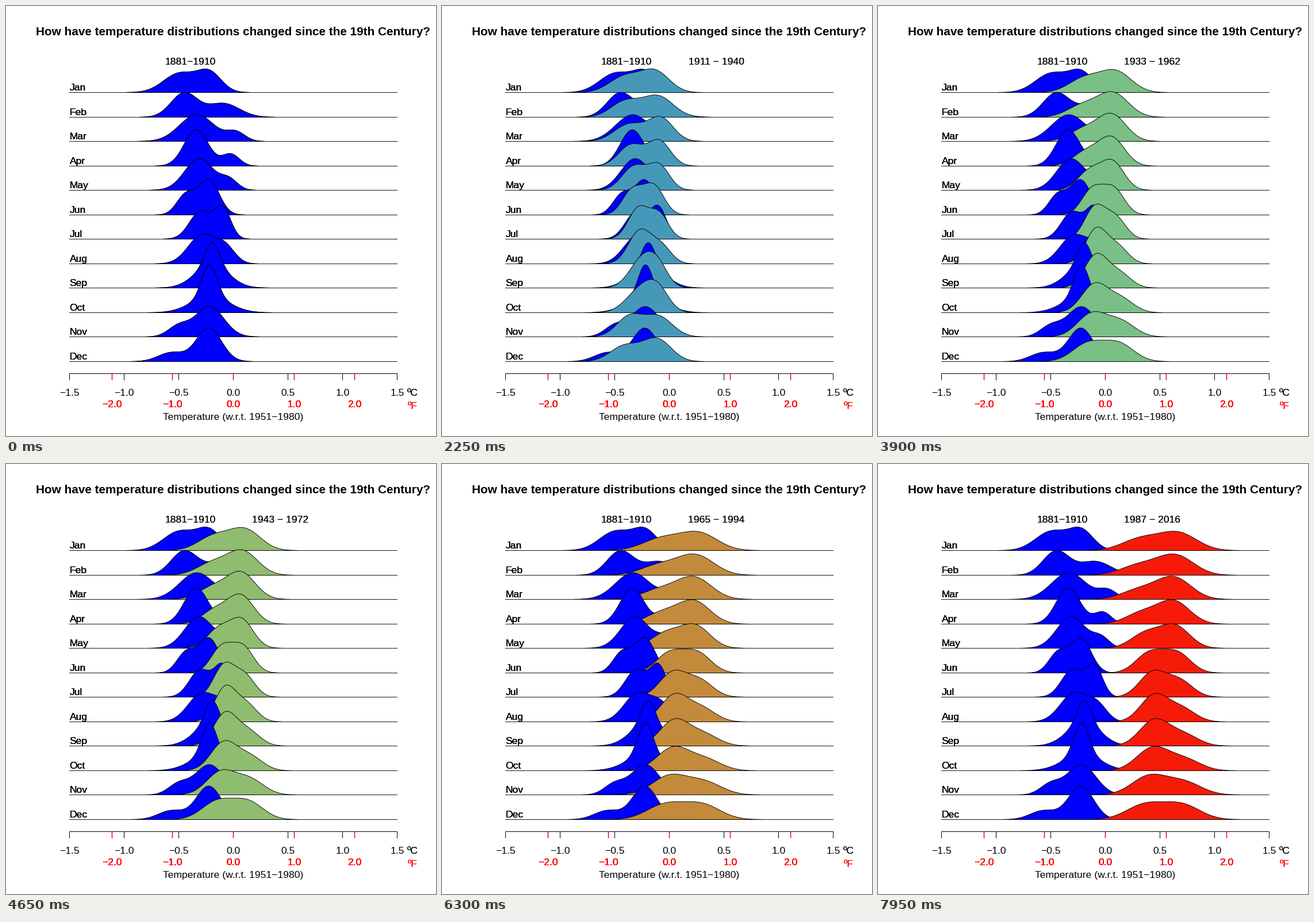
These frames come from a looping animation (748 by 748 pixels, 8 s). A matplotlib script:

```python
import numpy as np
import matplotlib.pyplot as plt
from matplotlib.animation import FuncAnimation
from matplotlib.patches import Polygon

SIZE, DPI = 748, 100
PX = 72 / DPI                      # one pixel in points
MONTHS = "Jan Feb Mar Apr May Jun Jul Aug Sep Oct Nov Dec".split()
SEASON = np.arange(12) * np.pi / 6
BASES = np.round(150 + 42.545 * np.arange(12)) + 0.5
LEFT, RIGHT, ZERO, UNIT = 110, 681, 395.5, 190
AREA = 1640                        # every density encloses the same area
X = np.arange(180, 740, 1.5)
MINUS = "\u2212"

FIRST_YEAR, YEARS_PER_STEP, SPAN = 1881, 2, 29
INTERVAL, HOLD, LOOP = 50, 3, 8000

# First period, two bumps a month: centre, spread, centre, spread, second share
START = np.array([
    (302, 28, 354, 21, .43), (310, 23, 378, 28, .41), (332, 30, 400, 16, .15),
    (331, 21, 391, 15, .19), (336, 25, 388, 15, .16), (313, 16, 353, 18, .66),
    (338, 19, 377, 14, .45), (341, 24, 382, 17, .27), (358, 29, 359, 12, .28),
    (355, 33, 354, 13, .44), (300, 18, 354, 25, .80), (288, 23, 353, 22, .78)])

# Warming and widening of the later periods, in degrees Celsius
KEY_YEARS = [1881, 1895, 1911, 1933, 1951, 1965, 1987]
KEY_MEANS = [-.26, -.27, -.20, -.02, 0, .13, .53]
KEY_SPREADS = [.16, .16, .165, .17, .17, .21, .21]


def later_bumps(year):
    """Two bumps around the year's mean, wider in winter, leaning by season."""
    mean = ZERO + UNIT * np.interp(year, KEY_YEARS, KEY_MEANS)
    spread = UNIT * (np.interp(year, KEY_YEARS, KEY_SPREADS)
                     + 0.035 * np.cos(SEASON))
    share = 0.5 + 0.2 * np.cos(SEASON - np.pi / 3)
    width = 0.7 * spread
    return np.column_stack([mean - 2 * share * width, width,
                            mean + 2 * (1 - share) * width, width, share])


def bumps_at(year):
    t = np.clip((year - FIRST_YEAR) / 44, 0, 1)
    return START + t * (later_bumps(year) - START)


def bell(centre, spread):
    return AREA / spread * np.exp(-0.5 * ((X - centre) / spread) ** 2)


def outline(bumps, base):
    c1, s1, c2, s2, share = bumps
    curve = (1 - share) * bell(c1, s1) + share * bell(c2, s2)
    seen = curve > 0.12
    x, y = X[seen], base - curve[seen]
    return np.column_stack([np.r_[x[0], x, x[-1]], np.r_[base, y, base]])


def tint(year):
    p = (year - FIRST_YEAR) / 110
    return p, 3 * p * (1 - p), 1 - p


plt.rcParams["font.family"] = "Liberation Sans"
fig = plt.figure(figsize=(SIZE / DPI, SIZE / DPI), dpi=DPI, facecolor="white")
ax = fig.add_axes([0, 0, 1, 1])
ax.set(xlim=(0, SIZE), ylim=(SIZE, 0))
ax.axis("off")


def write(x, y, text, size=17.5, ha="center", copies=1, **style):
    """Place text; stacked copies darken its soft edges."""
    return [ax.text(x, y, text, fontsize=size * PX, ha=ha, va="baseline",
                    zorder=50, **style) for _ in range(copies)]


def rule(x, y, color="black", width=1, z=40):
    ax.plot(x, y, color=color, lw=width * PX, zorder=z, snap=False,
            solid_capstyle="butt")


def ridge(z):
    patch = Polygon([(0, 0), (1, 0), (1, 1)], closed=True, facecolor="blue",
                    edgecolor="black", lw=0.9 * PX, zorder=z)
    return ax.add_patch(patch)


def tick_label(value):
    return f"{value:.1f}".replace("-", MINUS)


write(395, 51, "How have temperature distributions changed since the "
      "19th Century?", size=20.75, weight="bold")
write(321, 102, f"1881{MINUS}1910", copies=2)
period_label = write(477.5, 102, "", copies=2)

moving = []
for i, (month, base) in enumerate(zip(MONTHS, BASES)):
    rule([LEFT, RIGHT], [base, base], width=0.9, z=i)
    write(110.5, base - 3.5, month, ha="left", copies=3)
    ridge(i + 0.1).set_xy(outline(START[i], base))
    moving.append(ridge(i + 0.2))

rule([LEFT, RIGHT], [639.5, 639.5])
for celsius in np.arange(-1.5, 1.6, 0.5):
    x = np.floor(ZERO + UNIT * celsius) + 0.5
    rule([x, x], [639, 651])
    write(x, 678, tick_label(celsius))
for fahrenheit in range(-2, 3):
    x = np.floor(ZERO + UNIT * fahrenheit / 1.8) + 0.5
    rule([x, x], [640, 651], color="red", width=1.5, z=41)
    write(x, 698, tick_label(fahrenheit), color="red", copies=4)
write(707, 678, "\u00baC", copies=2)
write(707, 701, "\u00baF", color="red", copies=2)
write(395, 720, f"Temperature (w.r.t. 1951{MINUS}1980)")


def update(frame):
    step = frame // HOLD
    year = FIRST_YEAR + YEARS_PER_STEP * step
    for patch, bumps, base in zip(moving, bumps_at(year), BASES):
        patch.set_xy(outline(bumps, base))
        patch.set_facecolor(tint(year))
    for label in period_label:
        label.set_text(f"{year} {MINUS} {year + SPAN}" if step else "")
    return moving + period_label


anim = FuncAnimation(fig, update, frames=LOOP // INTERVAL, interval=INTERVAL,
                     repeat=True, repeat_delay=0, blit=False)
plt.show()
```
